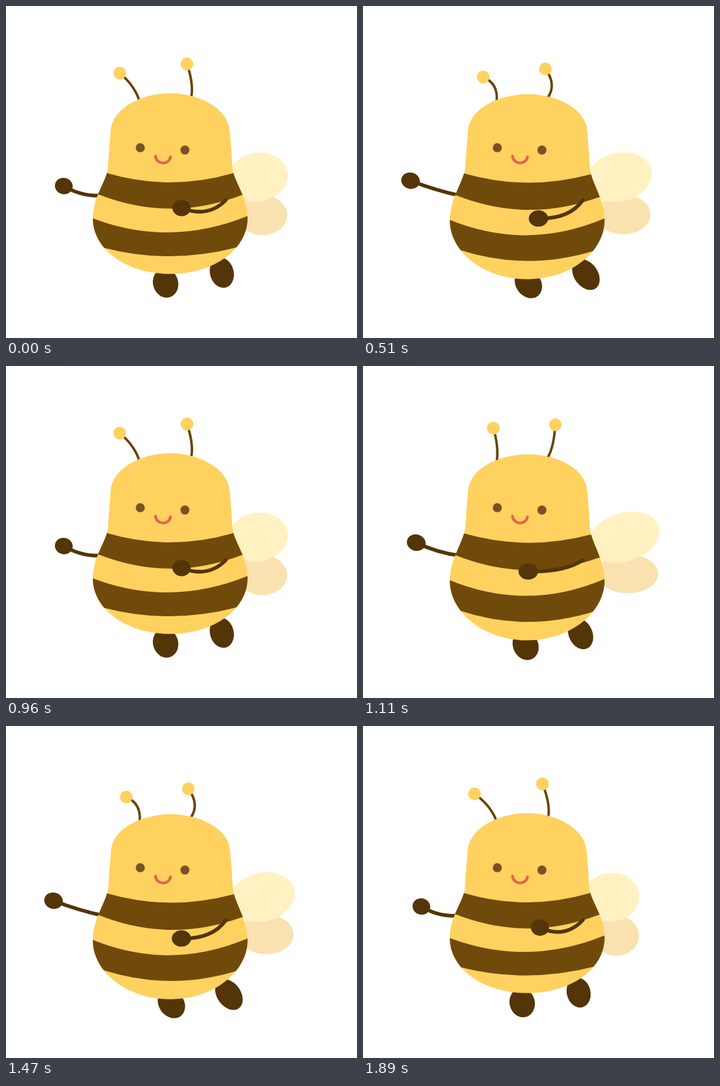
Animation, 574 px wide and 544 px high, one loop 1.92 s. Source, as an HTML page:

```html
<!DOCTYPE html>
<html lang="en">
<head>
<meta charset="utf-8">
<title>Dancing bee</title>
<style>
  html, body { margin: 0; width: 100%; height: 100%; overflow: hidden; background: #fff; }
  svg { display: block; width: 574px; height: 544px; }
  .dark { fill: #533508; }
  .gold { fill: #ffd15f; }
  .stripe { fill: #704a0a; }
  .eye { fill: #7a5124; }
  .line { fill: none; stroke: #533508; stroke-width: 6; stroke-linecap: round; }
  .stem { stroke: #684309; stroke-width: 4; }
  .mouth { stroke: #dd684c; stroke-width: 4.5; }
</style>
</head>
<body>
<svg viewBox="0 0 574 544">
  <clipPath id="clip"><path id="clipShape"/></clipPath>
  <ellipse id="wingLow" fill="#f9e1b0"/>
  <ellipse id="wingUp" fill="#fff1c1"/>
  <ellipse id="footL" class="dark"/>
  <ellipse id="footR" class="dark"/>
  <path id="stemL" class="line stem"/>
  <path id="stemR" class="line stem"/>
  <circle id="tipL" class="gold" r="10.4"/>
  <circle id="tipR" class="gold" r="10.4"/>
  <path id="armL" class="line"/>
  <ellipse id="handL" class="dark"/>
  <path id="body" class="gold"/>
  <g clip-path="url(#clip)">
    <path id="stripe1" class="stripe"/>
    <path id="stripe2" class="stripe"/>
  </g>
  <circle class="eye" cx="219.6" cy="232.2" r="7.4"/>
  <circle class="eye" cx="292.6" cy="236" r="7.4"/>
  <path class="line mouth" d="M244.5 246C246 260.5 267 261 269 247"/>
  <path id="armR" class="line"/>
  <ellipse id="handR" class="dark"/>
</svg>
<script>
const STEP = 30, BEAT = 960, FLAP = 480;

// Points in three poses: at rest, swung down, swinging back
const poses = {
  handL: [[94.5, 295], [82.5, 286], [78, 286.5]],
  handR: [[287, 331], [260, 340], [288, 348]],
  tipL: [[186, 110], [230, 97], [195, 117]],
  bendL: [[210, 130], [230, 135], [221, 127]],
  tipR: [[296, 95], [326, 97], [297, 103]],
  bendR: [[307, 128], [315, 138], [317, 128]],
  footL: [[261, 454], [269, 460], [270.3, 454.6]],
  footR: [[353, 437], [357.5, 440], [364.5, 440]]
};

const $ = id => document.getElementById(id);
const set = (id, attrs) => {
  for (const name in attrs) $(id).setAttribute(name, attrs[name]);
};
const oval = (id, [cx, cy], rx, ry, turn = 0) =>
  set(id, { cx, cy, rx, ry, transform: `rotate(${turn} ${cx} ${cy})` });
const dot = (id, [cx, cy]) => set(id, { cx, cy });
const curve = (id, from, bend, to) => set(id, { d: `M${from}Q${bend} ${to}` });

const ramp = (t, from, to) => {
  const u = Math.min(1, Math.max(0, (t - from) / (to - from)));
  return u * u * (3 - 2 * u);
};
const pulse = (t, rise, top, fall, end) => ramp(t, rise, top) * (1 - ramp(t, fall, end));

function bodyPath(k) {
  const top = 143 + 3 * k, wide = 348 + 7 * k, low = 439 + 17 * k;
  const mid = 268.5 + k;
  const L = x => x + k, R = x => 537 - x + 1.5 * k;
  return `M${mid} ${top}C${L(222)} ${top} ${L(171)} 168 ${L(171)} 208`
    + `C${L(169)} 230 ${L(168)} 245 ${L(167)} 262C166 287 142 ${wide - 38} 142 ${wide}`
    + `C142 ${wide + 50} 196 ${low} 268.5 ${low}`
    + `C341 ${low} 395 ${wide + 50} 395 ${wide}C395 ${wide - 38} 371 287 ${R(167)} 262`
    + `C${R(168)} 245 ${R(169)} 230 ${R(171)} 208C${R(171)} 168 ${R(222)} ${top} ${mid} ${top}Z`;
}

// Each edge: left x, left y, sag y, right x, right y
const band = (a, b) =>
  `M130 ${a[1]}H${a[0]}Q268.5 ${a[2]} ${a[3]} ${a[4]}H410V${b[4]}H${b[3]}`
  + `Q268.5 ${b[2]} ${b[0]} ${b[1]}H130Z`;

function drawBody(k) {
  const d = bodyPath(k);
  set("body", { d });
  set("clipShape", { d });
  set("stripe1", { d: band(
    [166, 274 + k, 304 - k / 2, 371, 274 + 4 * k],
    [152, 309 + 2 * k, 354.5 + 3.5 * k, 385, 310 + 7 * k]) });
  set("stripe2", { d: band(
    [142, 348 + 5 * k, 396 + 11.5 * k, 395, 344 + 8 * k],
    [159, 396 + 8 * k, 424.5 + 20.5 * k, 379, 395 + 11 * k]) });
}

function drawWings(t) {
  const open = pulse((t + 60) % FLAP, 0, 160, 180, 340);
  const up = 44 + 17 * open, low = 36 + 15 * open;
  oval("wingUp", [448 + 42 * open - up, 280.5], up, 40, -18 * Math.sqrt(open));
  oval("wingLow", [448 + 38 * open - low, 344 - 4 * open], low, 33 - open);
}

function draw(time) {
  const t = time % BEAT;
  // The down swing starts just before the beat, from a slight lean the other way
  const down = 1.156 * pulse((t + 90) % BEAT, 0, 390, 430, 660) - .156;
  const back = pulse(t, 300, 440, 500, 660);
  const mix = (rest, a, b) => rest + down * (a - rest) + back * (b - rest);

  const p = {};
  for (const name in poses) {
    const [rest, a, b] = poses[name];
    p[name] = rest.map((v, i) => mix(v, a[i], b[i]));
  }
  const k = mix(0, 1, .48), tilt = mix(15, 30, 35);

  drawBody(k);
  drawWings(t);

  oval("footL", p.footL, 20.6, 23 + tilt / 14, -tilt);
  oval("footR", p.footR, 19.4, 23 + tilt / 7.5, -tilt);

  curve("stemL", [218 + k, 155 + 3 * k], p.bendL, p.tipL);
  curve("stemR", [303 - 2 * k, 149 + 3 * k], p.bendR, p.tipR);
  dot("tipL", p.tipL);
  dot("tipR", p.tipR);

  const [lx, ly] = p.handL;
  curve("armL", p.handL, [120 + (lx - 80) * .3, 302 + (ly - 286) * 1.2], [158, 310.5]);
  oval("handL", p.handL, 14.6 + k * 1.4, 13.4, 14);

  const dx = p.handR[0] - 287, dy = p.handR[1] - 331;
  curve("armR", p.handR,
    [330 + dx * .19 + dy * .45, 348 + dx * .62 + dy * .08], [359.5, 318]);
  oval("handR", p.handR, 15 + k * 1.6, 13.4, 8 - 16 * k);
}

const start = performance.now();
function tick() {
  const t = Math.max(0, performance.now() - start);
  draw(Math.floor(t / STEP) * STEP);
  requestAnimationFrame(tick);
}
tick();
</script>
</body>
</html>
```
